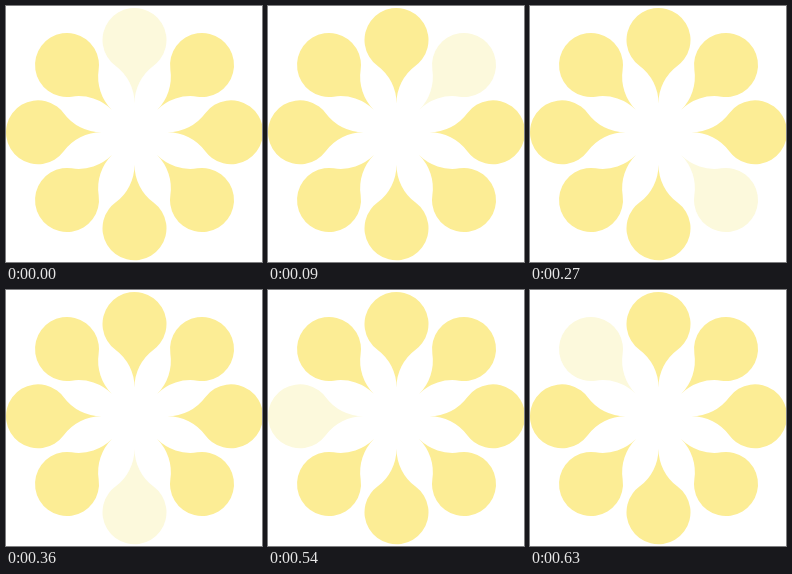
An HTML page with a canvas for the animation above (0.72 s loop, 256x256 px).

```html
<!DOCTYPE html>
<html lang="en">
<head>
<meta charset="utf-8">
<title>Petal spinner</title>
<style>
  html, body { margin: 0; width: 100%; height: 100%; overflow: hidden; background: #fff; }
  canvas { display: block; width: 100vw; height: 100vh; }
</style>
</head>
<body>
<canvas id="stage" width="256" height="256"></canvas>
<script>
const ctx = document.getElementById('stage').getContext('2d');
const STEP = 90;
const FULL = '#fced95';
const PALE = '#fcf9dc';
const R = 32;
const TIP = 63.5;

// Bulb centres, clockwise from the top
const petals = [
  [128.5, 34], [196, 59], [225, 126.3], [196, 194],
  [128.5, 222.3], [61, 194], [32, 126.3], [61, 59]
];

// A drop pointing down the y axis: a round bulb whose concave flanks
// touch the bulb and meet at the tip
function makeDrop() {
  const flank = (TIP * TIP - R * R) / (2 * R);
  const a = Math.atan2(TIP, flank);
  const path = new Path2D();
  path.arc(0, 0, R, Math.PI - a, a);
  path.arc(flank, TIP, flank, Math.PI + a, Math.PI, true);
  path.arc(-flank, TIP, flank, 0, -a, true);
  path.closePath();
  return path;
}

const drop = makeDrop();

function draw(time) {
  const active = Math.floor(time / STEP) % petals.length;
  ctx.fillStyle = '#fff';
  ctx.fillRect(0, 0, 256, 256);
  petals.forEach(([x, y], i) => {
    ctx.save();
    ctx.translate(x, y);
    ctx.rotate(i * Math.PI / 4);
    ctx.fillStyle = i === active ? PALE : FULL;
    ctx.fill(drop);
    ctx.restore();
  });
}

let start;
function tick(now) {
  start ??= now;
  draw(Math.max(0, now - start));
  requestAnimationFrame(tick);
}

draw(0);
requestAnimationFrame(tick);
</script>
</body>
</html>
```
